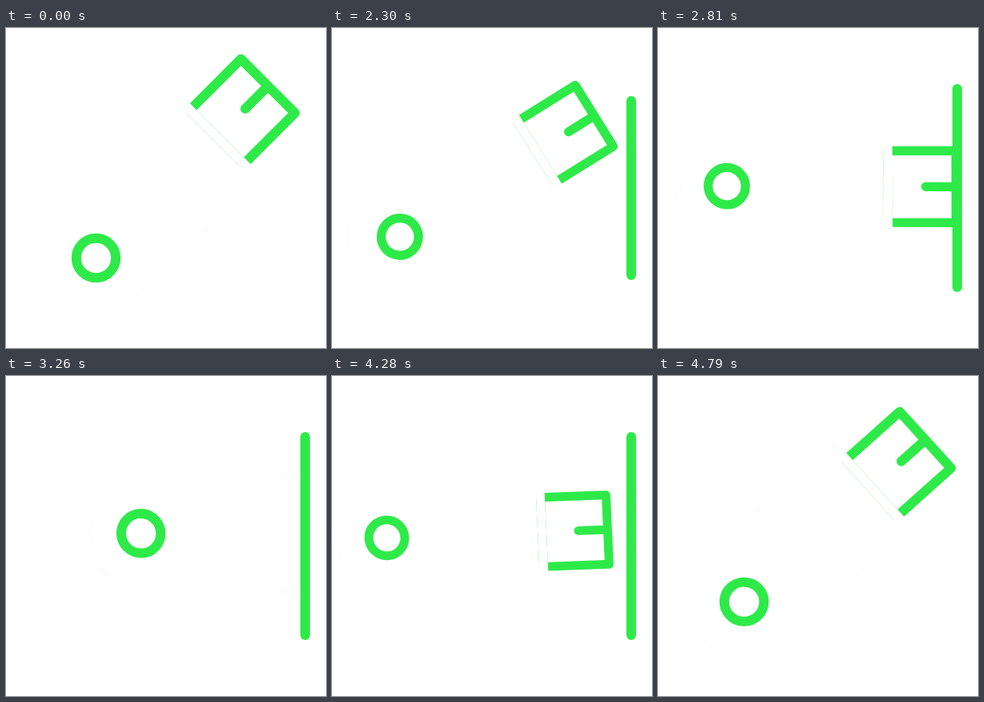
Recreate the animation shown at these times as an HTML page with a canvas. Size 400 px wide and 400 px high, loop 4.82 s.

```html
<!DOCTYPE html>
<html>
<head>
<meta charset="utf-8">
<style>
  html, body { margin: 0; width: 100%; height: 100%; overflow: hidden; background: #fff; }
  canvas { display: block; }
</style>
</head>
<body>
<canvas id="stage" width="400" height="400"></canvas>
<script>
const ctx = document.getElementById('stage').getContext('2d');
const GREEN = '#2eea49', WHITE = '#fefefe';
const LOOP = 4820, HOLD = 2000, STEP = 30;

// Cubic bezier easing with control points (x1, 0) and (x2, 1)
function bezier(x1, x2) {
  return x => {
    let lo = 0, hi = 1, u = 0.5;
    for (let i = 0; i < 24; i++) {
      u = (lo + hi) / 2;
      const guess = 3 * u * (1 - u) * ((1 - u) * x1 + u * x2) + u ** 3;
      if (guess < x) lo = u; else hi = u;
    }
    return u * u * (3 - 2 * u);
  };
}
const smooth = bezier(1 / 3, 2 / 3);
const swift = bezier(0.4, 0.2);

// Eased progress from 0 to 1 while the tick runs from start to end
function ramp(tick, start, end, ease = smooth) {
  const x = (tick - start) / (end - start);
  return x <= 0 ? 0 : x >= 1 ? 1 : ease(x);
}

function stroke(color, draw) {
  ctx.strokeStyle = color;
  ctx.beginPath();
  draw();
  ctx.stroke();
}

function line(...points) {
  points.forEach(([x, y], i) => i ? ctx.lineTo(x, y) : ctx.moveTo(x, y));
}

function drawStick(x, y, angle, scale, skew) {
  ctx.save();
  ctx.beginPath();
  ctx.rect(0, 0, 374, 400);
  ctx.clip();
  ctx.translate(x, y);
  ctx.rotate(-angle * Math.PI / 180);
  ctx.transform(scale, scale * skew, 0, scale, 0, 0);

  // Plug
  ctx.lineCap = 'round';
  stroke(GREEN, () => {
    line([90, -47.7], [180.2, -47.7], [180.2, 47.7], [90, 47.7]);
    ctx.closePath();
    line([180, 0], [140, 0]);
  });

  // Body
  stroke(WHITE, () => {
    ctx.moveTo(90, -73);
    ctx.lineTo(90, 73);
    ctx.arc(-116, 0, 73, Math.PI / 2, -Math.PI / 2);
    ctx.closePath();
  });
  stroke(GREEN, () => ctx.arc(-123.7, 0, 24.7, 0, 2 * Math.PI));
  ctx.restore();
}

function drawWall(size) {
  if (size <= 0) return;
  ctx.lineCap = 'round';
  stroke(GREEN, () => line([374, 200 - 124 * size], [374, 200 + 124 * size]));
}

function render(time) {
  const tick = Math.max(0, Math.floor((time % LOOP - HOLD) / STEP));

  const level = ramp(tick, 0, 28) - ramp(tick, 72.4, 96.6);
  const x = 200 - 21 * ramp(tick, 0, 20, swift) + 119 * ramp(tick, 20, 50, swift)
    - 119 * ramp(tick, 63, 73) + 21 * ramp(tick, 72, 94);
  const scale = 1 - 0.1 * (ramp(tick, 0, 18) - ramp(tick, 18, 38)
    + ramp(tick, 63, 73) - ramp(tick, 72, 94));
  const skew = 0.0095 * ramp(tick, 10, 40);
  const wall = ramp(tick, 1, 12.5) - ramp(tick, 78.2, 90);

  ctx.fillStyle = '#fff';
  ctx.fillRect(0, 0, 400, 400);
  ctx.lineWidth = 12;
  ctx.lineJoin = 'round';
  drawStick(x, 200 - 2 * level, 45 * (1 - level), scale, skew);
  drawWall(wall);
}

const begin = performance.now();
function loop() {
  render(performance.now() - begin);
  requestAnimationFrame(loop);
}
loop();
</script>
</body>
</html>
```
